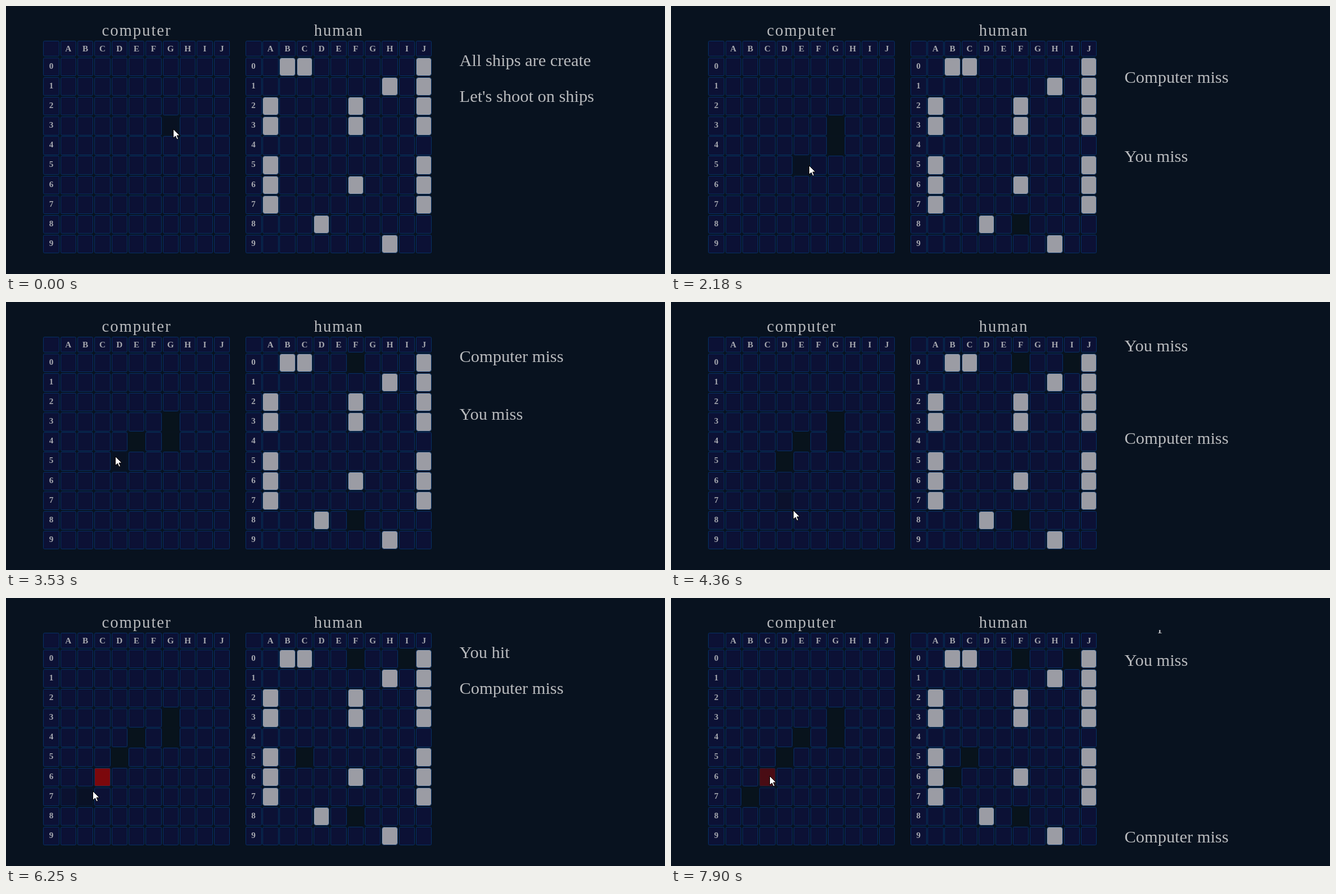
Write an HTML page with a canvas that moves like this. It is 1172x478 px and loops after 8 s.

```html
<!DOCTYPE html>
<html lang="en">
<head>
<meta charset="utf-8">
<title>Sea battle</title>
<style>
  html, body { margin: 0; width: 100%; height: 100%; overflow: hidden; background: #08121f; }
  canvas { display: block; }
</style>
</head>
<body>
<canvas id="stage" width="1172" height="478"></canvas>
<script>
const ctx = document.getElementById('stage').getContext('2d');
const LOOP = 8000;
const SERIF = '"Liberation Serif", "Times New Roman", serif';
const PAGE = '#08121f', SEA = '#0c1135', BORDER = '#063166', SHIP = '#9b9ca4', HIT = '#7c080c', MISS = '#08131c';
const TEXT = '#b8babd', LABEL = '#a6a8af';
const LETTERS = 'ABCDEFGHIJ';
const COLUMN = 30.33, ROW = 35.11, TOP = 91.9;
const SHIFT_TIME = 300, RISE_TIME = 790, FADE_TIME = 300, MOVE_TIME = 300;

const ships = 'B0 C0 J0 H1 J1 A2 F2 J2 A3 F3 J3 A5 J5 A6 F6 J6 A7 J7 D8 H9'.split(' ');
const enemyShip = 'C6';

// Each shot marks its cell and adds a line to the log
const shots = [
  [585, 'You', 'G3'], [1590, 'Computer', 'F8'], [1768, 'You', 'G4'],
  [2710, 'Computer', 'F0'], [2968, 'You', 'E4'], [3939, 'Computer', 'I0'],
  [4252, 'You', 'D5'], [5175, 'You', 'C6'], [5367, 'Computer', 'C5'],
  [6680, 'You', 'B7'], [7690, 'Computer', 'B6']
];

// Pointer stops: arrival time and place
const stops = [
  [0, 297, 219], [690, 292, 250], [1950, 246, 286], [2440, 232, 254],
  [3420, 194, 275], [4360, 217, 371], [4760, 175, 318], [5570, 306, 274],
  [5830, 118, 372], [6250, 154, 344], [6960, 166, 392], [7860, 175, 317]
];

const smooth = v => {
  v = Math.max(0, Math.min(1, v));
  return v * v * (3 - 2 * v);
};

function pointerAt(t) {
  let [, x, y] = stops[0];
  for (const [arrival, nextX, nextY] of stops.slice(1)) {
    const k = smooth((t - arrival) / MOVE_TIME + 1);
    x += (nextX - x) * k;
    y += (nextY - y) * k;
  }
  return [x, y];
}

// Share of the last moments that the pointer spent over each cell
function hoverLevels(t) {
  const levels = {}, samples = 20;
  for (let i = 0; i < samples; i++) {
    const [x, y] = pointerAt(t - i * FADE_TIME / samples);
    const key = LETTERS[Math.floor((x - 96) / COLUMN)] + Math.floor((y - 91) / ROW);
    levels[key] = (levels[key] || 0) + 1 / samples;
  }
  return levels;
}

function text(str, x, y, font, color, align = 'left', spacing = 0) {
  ctx.font = `${font} ${SERIF}`;
  ctx.fillStyle = color;
  ctx.textAlign = align;
  ctx.letterSpacing = spacing + 'px';
  ctx.fillText(str, x, y);
}

// Edges snap to whole pixels, as table cells do
function box(x, y, w, h, fill, radius = 2) {
  const left = Math.round(x), top = Math.round(y);
  const width = Math.round(x + w) - left, height = Math.round(y + h) - top;
  ctx.fillStyle = fill;
  if (fill === MISS) return ctx.fillRect(left, top, width, height);
  ctx.beginPath();
  ctx.roundRect(left + .5, top + .5, width - 1, height - 1, radius);
  ctx.fill();
  ctx.strokeStyle = BORDER;
  ctx.stroke();
}

function board(title, titleX, left, cellStyle) {
  const label = (str, x, y) => text(str, x, y, 'bold 15.2px', LABEL, 'center');
  text(title, titleX, 53, '28.8px', TEXT, 'left', 1.9);
  box(left, 62, 29, 28, SEA);
  for (let i = 0; i < 10; i++) {
    const x = left + 30.3 + COLUMN * i, y = TOP + ROW * i;
    box(x, 62, 28.4, 28, SEA);
    label(LETTERS[i], x + 14.2, 81);
    box(left, y, 29, 33.3, SEA);
    label(i, left + 14.3, Math.round(y) + 20);
    for (let r = 0; r < 10; r++) {
      const { fill, alpha = 1, radius } = cellStyle(LETTERS[i] + r);
      ctx.globalAlpha = alpha;
      box(x, TOP + ROW * r, 28.4, 33.3, fill, radius);
      ctx.globalAlpha = 1;
    }
  }
}

// Every new line rises from below while the older ones move up one place
function log(t) {
  const lines = [['All ships are create', -LOOP], ["Let's shoot on ships", -LOOP]];
  let moved = 0;
  for (const [time, who, cell] of shots) {
    lines.push([`${who} ${cell === enemyShip ? 'hit' : 'miss'}`, time]);
    moved += smooth((t - time) / SHIFT_TIME);
  }
  ctx.save();
  ctx.beginPath();
  ctx.rect(800, 57, 372, 389);
  ctx.clip();
  lines.forEach(([str, time], i) => {
    const rise = .00075 * Math.max(0, time + RISE_TIME - t) ** 2;
    text(str, 806.6, 107 + 64 * (i - moved) + rise, '30.4px', TEXT);
  });
  ctx.restore();
}

function pointer(t) {
  const [x, y] = pointerAt(t);
  const arrow = new Path2D('M0 0V16L4 12.5L6.5 18.5L9 17.5L6.5 11.5H11.5Z');
  ctx.save();
  ctx.translate(Math.round(x) + .5, Math.round(y) + .5);
  ctx.fillStyle = '#fff';
  ctx.strokeStyle = '#000';
  ctx.fill(arrow);
  ctx.stroke(arrow);
  ctx.restore();
}

function draw(t) {
  ctx.fillStyle = PAGE;
  ctx.fillRect(0, 0, 1172, 478);

  const hover = hoverLevels(t);
  const isShot = (who, key) => shots.some(s => s[1] === who && s[2] === key && t >= s[0]);
  board('computer', 170.5, 66.3, key => {
    const shot = isShot('You', key);
    if (shot && key !== enemyShip) return { fill: MISS };
    return { fill: shot ? HIT : SEA, alpha: 1 - .88 * smooth(hover[key] || 0) };
  });
  board('human', 547.7, 425.8, key => {
    if (isShot('Computer', key)) return { fill: MISS };
    return ships.includes(key) ? { fill: SHIP, radius: 4 } : { fill: SEA };
  });
  log(t);
  pointer(t);
}

const start = performance.now();
function tick() {
  draw((performance.now() - start) % LOOP);
  requestAnimationFrame(tick);
}
tick();
</script>
</body>
</html>
```
